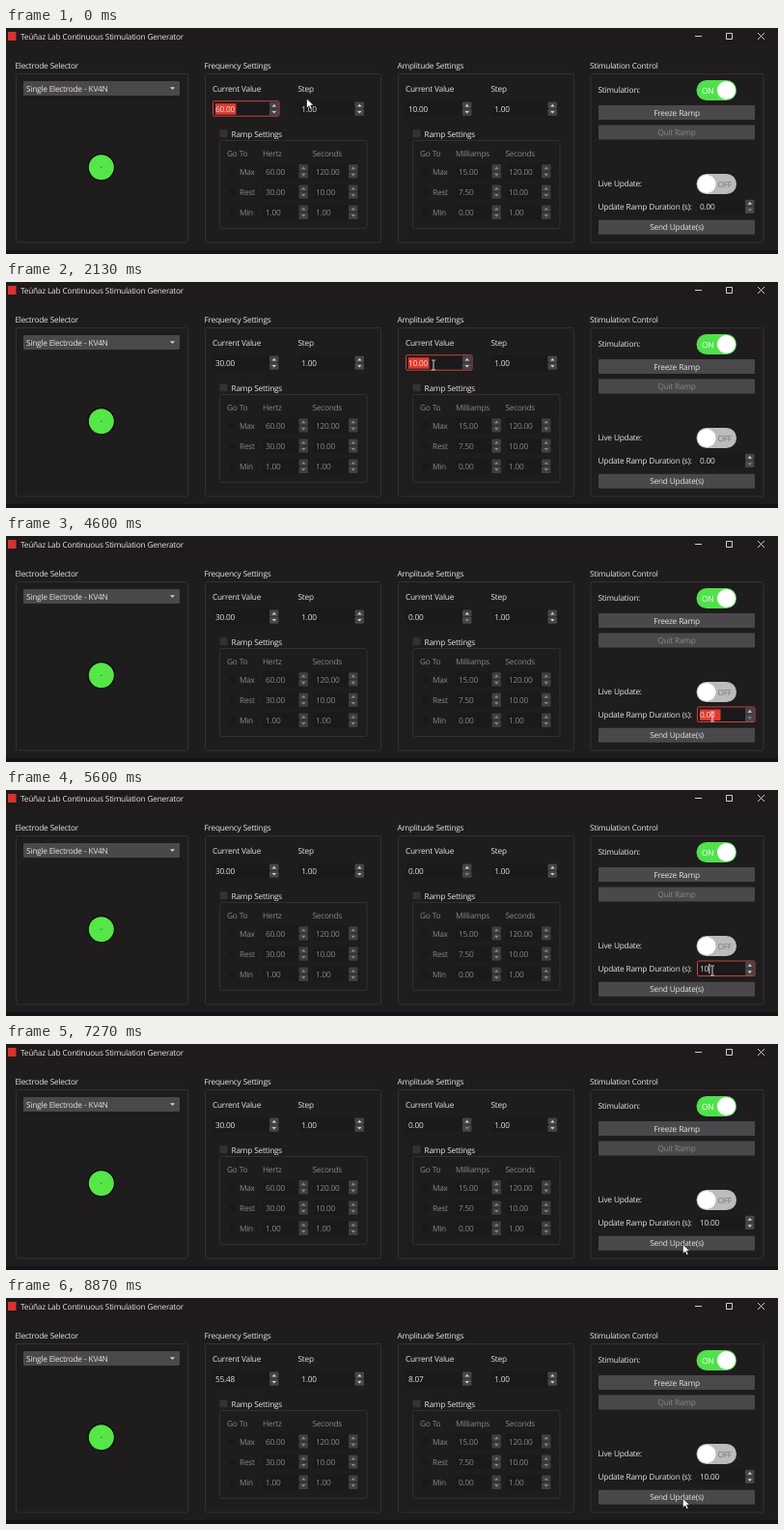
Animation, 800 px wide and 234 px high, one loop 8940 ms. Source, as an HTML page:

```html
<!DOCTYPE html>
<html lang="en">
<head>
<meta charset="utf-8">
<title>Stimulation Generator</title>
<style>
  html, body { margin: 0; width: 100%; height: 100%; overflow: hidden; background: #1f1c1e; }
  svg { display: block; width: 100%; height: 100%; }
  text {
    font: 8.3px "Open Sans", "Noto Sans", sans-serif;
    letter-spacing: -.03em;
    word-spacing: .035em;
    fill: #e4e3e4;
    text-rendering: geometricPrecision;
    white-space: pre;
  }
  .dim { fill: #8a8788; }
  .mid { text-anchor: middle; }
  .frame { fill: none; stroke: #333032; }
  .button { fill: #4a484b; }
  .field { fill: #1b191b; }
  .focus { stroke: #c8443a; }
</style>
</head>
<body>
<svg id="stage" viewBox="0 0 800 234" xmlns="http://www.w3.org/2000/svg"></svg>
<script>
const LOOP = 8940, FPS = 15, BLINK = 530, DIGIT = 4.5;
const stage = document.getElementById('stage');
const byId = id => document.getElementById(id);

const text = (x, y, label, cls = '') => `<text x="${x}" y="${y}" class="${cls}">${label}</text>`;
const rect = (x, y, w, h, attrs, r = 1) =>
  `<rect x="${x}" y="${y}" width="${w}" height="${h}" rx="${r}" ${attrs}/>`;
const circle = (x, y, r, attrs) => `<circle cx="${x}" cy="${y}" r="${r}" ${attrs}/>`;
const triangle = (x, y, half, height, fill, id = '') =>
  `<path ${id && `id="${id}"`} d="M${x - half} ${y}h${2 * half}l${-half} ${height}z" fill="${fill}"/>`;
const group = (x, w, title) => text(x - .5, 42, title) + rect(x + .5, 47.5, w, 174.5, 'class="frame"', 2);

const button = (y, label, cls = '') =>
  rect(614, y, 162, 15, 'class="button"') + text(695, y + 10.6, label, cls + ' mid');

// Number field centred on y, with its pair of step buttons
function spin(x, y, w, value, id = '', dim = false) {
  const bx = x + w - 10.5, cx = bx + 4.8;
  const arrow = dim ? '#8a8788' : '#d0ced0', face = dim ? '#403e41' : '#474548';
  const name = part => id ? `id="${id}${part}"` : '';
  return rect(x + .5, y - 8, w - 1, 15.5, `class="field" ${name('Box')}`, 1.5) +
    rect(bx, y - 7.3, 9.5, 7, `fill="${face}"`) + rect(bx, y + .1, 9.5, 7, `fill="${face}"`) +
    triangle(cx, y - 2.3, 2.2, -2.7, arrow) + triangle(cx, y + 2.2, 2.2, 2.7, arrow, id && id + 'Down') +
    (id ? rect(x + 3, y - 5.5, 21.5, 11.5, `fill="#e23a2e" ${name('Select')}`, 0) : '') +
    `<text x="${x + 3}" y="${y + 3}" class="${dim ? 'dim' : ''}" ${name('Value')}>${value}</text>` +
    (id ? rect(0, y - 5, .9, 10, `fill="#f0f0f0" ${name('Caret')}`, 0) : '');
}

function settings(x, title, unit, value, id, rows) {
  let out = group(x, 182, title) +
    text(x + 8, 66, 'Current Value') + text(x + 96.5, 66, 'Step') +
    spin(x + 8, 83.7, 69.5, value, id) + spin(x + 97.3, 83.7, 68.7, '1.00') +
    rect(x + 15.5, 105.3, 8, 8, 'fill="#343134"') +
    text(x + 27.5, 112.6, 'Ramp Settings') +
    rect(x + 15.5, 116.5, 152.5, 91, 'class="frame"', 2) +
    text(x + 23, 133.3, 'Go To', 'dim') + text(x + 60, 133.3, unit, 'dim') +
    text(x + 111.5, 133.3, 'Seconds', 'dim');
  rows.forEach(([label, level, seconds], i) => {
    const y = 148.5 + i * 21.2;
    out += circle(x + 29, y, 3.8, 'fill="#1b181a"') +
      text(x + 36, y + 3, label, 'dim') +
      spin(x + 60, y, 48, level, '', true) + spin(x + 112, y, 47.5, seconds, '', true);
  });
  return out;
}

const toggle = (y, fill, knobX, textX, label, color) =>
  rect(715.5, y - 10.5, 41.5, 21, `fill="${fill}"`, 10.5) + circle(knobX, y, 9.6, 'fill="#fff"') +
  `<text x="${textX}" y="${y + 3}" style="fill:${color}">${label}</text>`;

stage.innerHTML =
  rect(0, 0, 800, 234, 'fill="#1f1c1e"', 0) + rect(0, 0, 800, 17, 'fill="#1f1a1b"', 0) +
  rect(0, 230, 800, 4, 'fill="#141214"', 0) +
  rect(2, 4, 8.5, 9, 'fill="#d8322c"', 0) +
  text(15, 11.5, 'Teúñaz Lab Continuous Stimulation Generator') +
  '<path d="M714 8.5h7M746.5 5.5h6v6h-6zM779 5l7 7m0-7l-7 7" fill="none" stroke="#e4e3e4" stroke-width=".9"/>' +

  group(10, 178, 'Electrode Selector') +
  rect(18, 55, 162, 15, 'class="button"') + text(21, 65.6, 'Single Electrode - KV4N') +
  triangle(172.5, 61.3, 2.5, 2.8, '#d0ced0') +
  circle(98.8, 144.3, 13.6, 'fill="#55e648" stroke="#0b0b0b" stroke-width="1.2"') +
  circle(98.8, 144.3, .8, 'fill="#27852a"') +

  settings(206, 'Frequency Settings', 'Hertz', '60.00', 'freq',
    [['Max', '60.00', '120.00'], ['Rest', '30.00', '10.00'], ['Min', '1.00', '1.00']]) +
  settings(406, 'Amplitude Settings', 'Milliamps', '10.00', 'amp',
    [['Max', '15.00', '120.00'], ['Rest', '7.50', '10.00'], ['Min', '0.00', '1.00']]) +

  group(605.5, 179, 'Stimulation Control') +
  text(613.5, 67, 'Stimulation:') + toggle(64.5, '#4fe24b', 746.5, 721, 'ON', '#fff') +
  button(80, 'Freeze Ramp') + button(100.5, 'Quit Ramp', 'dim') +
  text(613.5, 164.3, 'Live Update:') + toggle(161.5, '#bdbbbd', 726, 737.5, 'OFF', '#747274') +
  text(613.5, 188, 'Update Ramp Duration (s):') + spin(716, 185, 60.5, '0.00', 'time') +
  button(198.8, 'Send Update(s)') +

  '<path id="arrow" d="M0 0v10l2.4-2.2 1.6 3.5 1.8-.8-1.6-3.4h3.2z" fill="#fff" stroke="#111" stroke-width=".7"/>' +
  '<path id="beam" d="M-2-5h1.4l.6.5.6-.5H2M0-4.5v9M-2 5h1.4l.6-.5.6.5H2" fill="none" stroke="#e8e8e8" stroke-width=".9"/>';

// Each entry: start time, shown value, state
const script = {
  freq: [[0, '60.00', 'select'], [700, '3', 'edit'], [850, '30', 'edit'], [1950, '30.00']],
  amp: [[0, '10.00'], [1950, '10.00', 'select'], [2700, '0', 'edit'], [4560, '0.00']],
  time: [[0, '0.00'], [4560, '0.00', 'select'], [5000, '1', 'edit'], [5150, '10', 'edit'], [7150, '10.00']]
};
const ramps = { freq: [60, 55.48], amp: [10, 8.07] };
const RAMP_START = 7330, RAMP_END = 8866;

// Pointer stops: time, x, y
const stops = [
  [0, 311.5, 73], [1200, 314.5, 72.5], [1350, 314.5, 72.5], [1850, 443, 86], [2720, 443, 86],
  [3050, 483.3, 102.3], [3950, 483.3, 102.3], [4500, 732, 187], [6560, 732, 187],
  [6950, 701.3, 207.2], [LOOP, 701.3, 207.2]
];
// Areas where the pointer becomes a text beam: x, y, width
const editable = [[214, 76, 58], [304, 76, 57], [414, 76, 58], [504, 76, 57], [716, 177, 50]];

function showSpin(id, t) {
  let [since, value, state] = script[id].findLast(step => step[0] <= t);
  if (ramps[id] && t >= RAMP_START) {
    const [from, to] = ramps[id];
    value = (from + (to - from) * (t - RAMP_START) / (RAMP_END - RAMP_START)).toFixed(2);
  }
  const caretOn = state === 'edit' && Math.floor((t - since) / BLINK) % 2 === 0;
  const label = byId(id + 'Value'), caret = byId(id + 'Caret');
  label.textContent = value;
  byId(id + 'Box').classList.toggle('focus', !!state);
  byId(id + 'Select').style.display = state === 'select' ? '' : 'none';
  byId(id + 'Down').style.opacity = +value === 0 ? .45 : 1;
  caret.setAttribute('x', +label.getAttribute('x') + value.length * DIGIT + .4);
  caret.style.display = caretOn ? '' : 'none';
}

function showPointer(t) {
  const i = Math.max(1, stops.findIndex(stop => stop[0] >= t));
  const [t0, x0, y0] = stops[i - 1], [t1, x1, y1] = stops[i];
  const p = (t - t0) / (t1 - t0), ease = p * p * (3 - 2 * p);
  const x = x0 + (x1 - x0) * ease, y = y0 + (y1 - y0) * ease;
  const overText = editable.some(([ex, ey, w]) => x >= ex && x <= ex + w && y >= ey && y <= ey + 16);
  for (const id of ['arrow', 'beam']) {
    byId(id).setAttribute('transform', `translate(${x} ${y})`);
    byId(id).style.display = (id === 'beam') === overText ? '' : 'none';
  }
}

function draw() {
  const step = Math.floor((performance.now() % LOOP + 4) * FPS / 1000);
  const t = Math.min(step * 1000 / FPS, LOOP - 1);
  Object.keys(script).forEach(id => showSpin(id, t));
  showPointer(t);
  requestAnimationFrame(draw);
}
draw();
</script>
</body>
</html>
```
